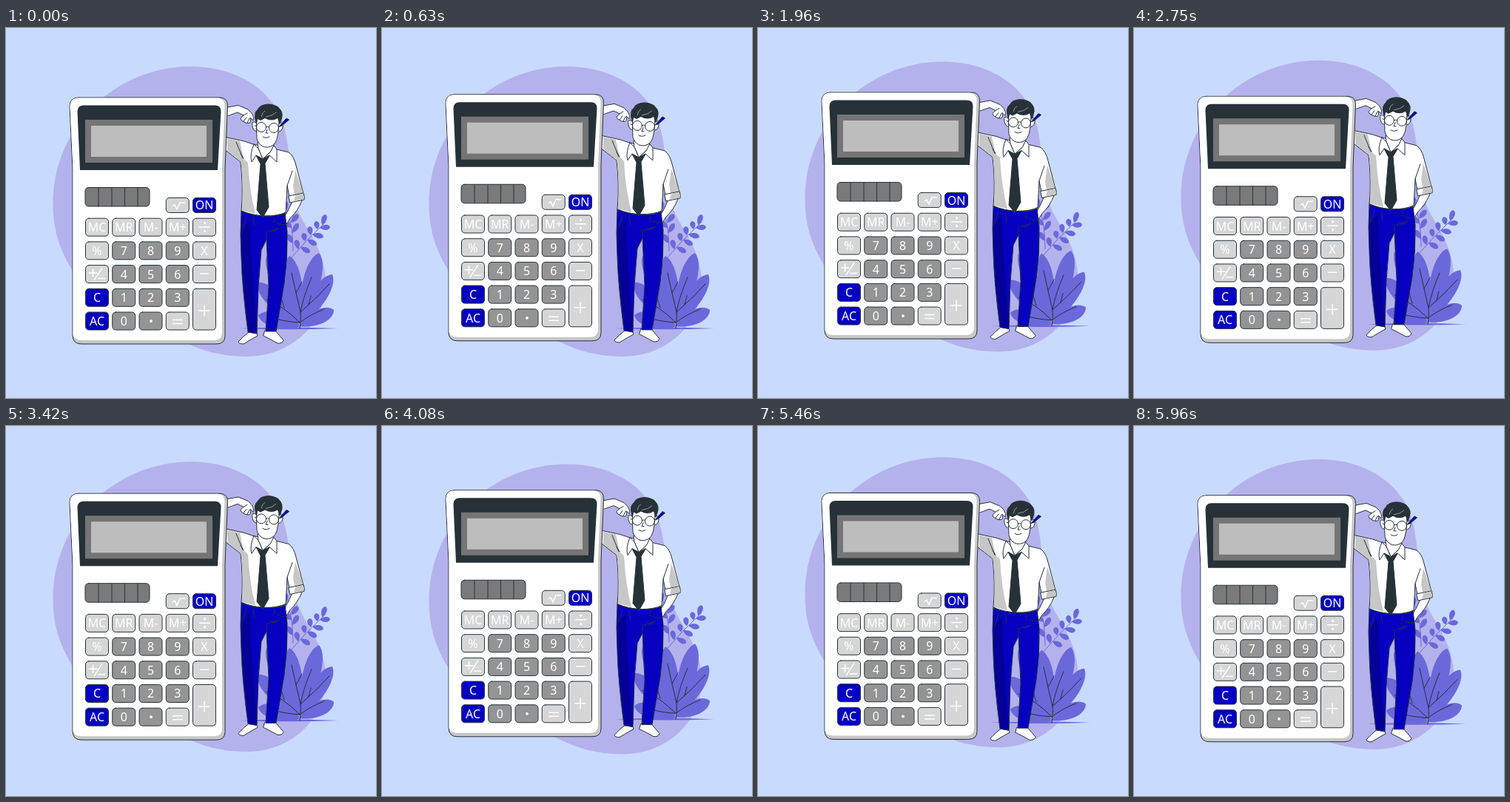
An HTML page for the animation above (6 s loop, 500 px wide and 500 px high).

```html
<!DOCTYPE html>
<html lang="en">
<head>
<meta charset="utf-8">
<title>Calculator</title>
<style>
  html, body { margin: 0; width: 100%; height: 100%; overflow: hidden; background: #c9daff; }
  svg { display: block; width: 100%; height: 100%; }
  text { font-family: "Noto Sans", "Open Sans", sans-serif; font-size: 16px; fill: #fff; text-anchor: middle; }
  .ink { stroke: #263238; stroke-width: 1; stroke-linejoin: round; stroke-linecap: round; }
  .white { fill: #fff; }
  .none { fill: none; }
  .dark { fill: #263238; }
  .grey { fill: #c7c7c7; }
  .blue { fill: #0600c0; }
  .sign { fill: none; stroke: #fff; stroke-width: 1.5; }
</style>
</head>
<body>
<svg viewBox="0 0 500 500">
  <path id="blob" fill="#b4b2ec" d="M250 52C300 52 344 73 366 110C387 148 381 198 391 237C400 268 430 294 432 340C434 400 385 444 325 444C290 444 262 435 240 424C190 400 121 385 88 325C71 296 63.500 270 63.500 238C63.500 133 148 52 250 52Z"/>

  <g id="plant" fill="#6b68dc">
    <path d="M315 406Q382 403.500 449 406Q382 408.500 315 406Z"/>
    <g id="leaves"></g>
    <path class="ink none" d="M397 406Q399 392 398 384Q391 355 386 331M398 384Q402 362 413 337M398 384Q420 365 437 346M397 398Q413 386 430 380M397 398Q374 375 352 367M376 378L368 352M397 398Q375 397 354 390M409 374L412 362M392 358L400 343"/>
    <path class="none" stroke="#6b68dc" d="M384 312Q405 287 432 262M378 240Q388 265 388 302"/>
  </g>

  <g id="man">
    <!-- raised arm -->
    <path class="ink white" d="M290 113L300 107L314 104.500L327 110L332 115Q336 121 334 125L330 121Q332 128 328 128.500Q324 129 321 126.500Q317 125 317 122L321 118L313 114L299 119L290 124Z"/>
    <path class="grey" d="M297 120L309 115L300 119V128H297Z"/>
    <path class="ink none" d="M321 118L326 115M321 126L325 121M326 128L329 122"/>
    <!-- forearm in pocket -->
    <path class="ink white" d="M400 233Q394 248 384 257L379 265L374 259L381 247L387 234Z"/>
    <!-- legs -->
    <path class="ink white" d="M328 411L339 413L340 416L331 421L321 427Q315 427 314 424Q320 417 328 411ZM350 409L364 409Q369 415 375 422Q373 427 367 426L356 420L348 416Z"/>
    <path class="ink blue" d="M318 248L377 250L380 275Q381 310 376 345L365 410L351 410L355 350L352 286L345 300L341 350L339 413L327 411Q319 350 318 310Q316 278 318 248Z"/>
    <path fill="#050098" d="M318.500 270L330 262Q330 305 334 340L339 411L328 410Q320 350 318.500 310Z"/>
    <path class="ink none" d="M352 286L352 276L367 271M334 256L336 268M363 257L362 263M325 255L320 272M366 263Q373 268 378 265M358 274Q365 276 369 270"/>
    <!-- shirt -->
    <path class="ink white" d="M290 145L299 148L322 153L334 157L366 164L382 168Q389 173 392 186L402 224L383 228L380 213L378 250Q366 255 350 254Q330 253 318 247Q321 215 317 181L299 167L290 160Z"/>
    <path class="grey" d="M299 149L316 153L321 176L327 182Q329 220 337 251L319 246.500Q321 215 317.500 181L299 166Z"/>
    <path class="grey" d="M391 192L401.500 223L390 225L388 214Z"/>
    <path class="ink none" d="M380 213L387 193M311 154L320 176M321 176L317 170M318 247Q335 254 350 254Q368 254 378 249"/>
    <path class="ink white" d="M382 227L402 223Q404 228 403 232L384 236Z"/>
    <path class="grey" d="M391 226L402 223.500V231.500L389 234Z"/>
    <path class="ink dark" d="M338 172L347 177L357 171L350 183L355 242L347 256L339 246L344 184Z"/>
    <path class="ink white" d="M340 155L341 163L347 177L361 164L362 155Z"/>
    <path class="ink white" d="M335 157L341 163L347 177L338 172L332 181Q329 171 335 157ZM362 159L366 164L366 181L356 172L347 177L357 168Z"/>
    <!-- head -->
    <path class="ink white" d="M338 128Q331 124 333 133Q335 141 339 139ZM368 128Q375 126 374 134Q372 141 367 140Z"/>
    <path class="ink white" d="M338 119L339 150Q342 159 350 161Q359 162 364 155Q369 146 369 119Z"/>
    <path class="dark" d="M337 126Q334 114 340 110Q343 103 354 102.500Q366 103 370 109Q375 114 373 122L370 131L367 122Q359 127 350 122L344 125L340 123L339 130Z"/>
    <path fill="none" stroke="#fff" stroke-width=".5" d="M345 120Q346 114 350 112M351 120Q360 119 365 114"/>
    <g class="ink none">
      <circle cx="345" cy="134" r="6.500"/>
      <circle cx="362" cy="135" r="6.500"/>
      <path d="M351.500 134Q353.500 132 355.500 134M338.500 133L336 132M368.500 134L371 132M353 137L351 142H354M347 147Q351 150 356 147"/>
    </g>
    <path class="ink blue" d="M371 131L379 122L382.500 124L373 132L370 133Z"/>
  </g>

  <g id="calc">
    <path class="ink grey" d="M98 94H290Q300 95 299.500 106L296 190V416Q296 427 284 427H102Q90 427 90 415V190L86 106Q86 94 98 94Z"/>
    <path class="white" d="M98 94.500H285Q296 95 295.500 106L292 190V411Q292 422 281 422H102Q92 422 90.500 415V190L86.500 106Q86.500 94.500 98 94.500Z"/>
    <path class="dark" d="M105 104.500H282Q291 104.500 290.500 113L286 192H100L96.500 113Q96.500 104.500 105 104.500Z"/>
    <path fill="#757575" d="M107 124H279V182H107Z"/>
    <path fill="#bdbdbd" d="M115 132H271V174H115Z"/>
    <rect class="ink" x="107" y="215.500" width="87" height="25.500" rx="4.500" fill="#7a7a7a"/>
    <path class="ink none" d="M125 216V241M143 216V241M160.500 216V241M178 216V241"/>
    <g id="keys"></g>
    <path class="sign" d="M225 241L228 239L231 245L235 236H242M261 269H276M262 332H274M260.500 382H275.500M268 374.500V389.500M225 394.500H239M225 399.500H239M112 331H123M117.500 325.500V336.500M119 341L130 324M124 338.500H134"/>
    <g class="white">
      <circle cx="268.500" cy="263.500" r="1.600"/>
      <circle cx="268.500" cy="274.500" r="1.600"/>
      <circle cx="196" cy="396" r="1.900"/>
    </g>
  </g>
</svg>
<script>
const $ = id => document.getElementById(id);
const light = '#d6d6d6', mid = '#949494', blue = '#0600c0';

function key(col, y, label, fill, h = 24) {
  const x = 107.5 + col * 36.25;
  return `<rect class="ink" x="${x}" y="${y}" width="31" height="${h}" rx="4.500" fill="${fill}"/>` +
    `<text x="${x + 15.5}" y="${y + h / 2 + 6}">${label}</text>`;
}

const rows = [['MC', 'MR', 'M-', 'M+', ''], ['%', 7, 8, 9, 'X'], ['', 4, 5, 6, ''],
  ['C', 1, 2, 3], ['AC', 0, '', '']];
let keys = key(3, 229.5, '', light, 20) + key(4, 229.5, 'ON', blue, 20) + key(4, 352.3, '', light, 55.7);
rows.forEach((row, r) => row.forEach((label, c) => {
  const numeric = r > 0 && c > 0 && c < 4 && !(r === 4 && c === 3);
  const fill = c === 0 && r > 2 ? blue : numeric ? mid : light;
  keys += key(c, 257.2 + r * 31.7, label, fill);
}));
$('keys').innerHTML = keys;

// Leaf from base (x, y) to tip (u, v), w wide on each side.
function leaf([x, y, u, v, w]) {
  const dx = u - x, dy = v - y, len = Math.hypot(dx, dy);
  const nx = -dy / len * w, ny = dx / len * w;
  const at = (k, s) => `${x + dx * k + nx * s} ${y + dy * k + ny * s}`;
  return `<path d="M${x} ${y}C${at(.4, 1.3)} ${at(.88, 1.3)} ${u} ${v}C${at(.88, -1.3)} ${at(.4, -1.3)} ${x} ${y}Z"/>`;
}

const big = [[397, 400, 352, 308, 10], [398, 400, 383, 308, 11], [399, 396, 423, 304, 12],
  [398, 402, 441, 333, 11], [396, 403, 443, 381, 10], [397, 403, 340, 344, 11], [397, 404, 341, 388, 10]];
const small = [[427, 266, 432, 252], [421, 272, 419, 261], [424, 270, 438, 269], [412, 280, 410, 268],
  [414, 279, 429, 282], [404, 288, 402, 277], [407, 286, 420, 293], [395, 299, 392, 286],
  [398, 296, 411, 303], [380, 245, 376, 233], [382, 250, 394, 240], [385, 263, 395, 252],
  [387, 277, 395, 264], [386, 270, 376, 261], [388, 291, 380, 279]];
$('leaves').innerHTML = big.concat(small.map(s => [...s, 3.7])).map(leaf).join('');

// Parts bob up 10 units and back: [period, delay] in ms.
const bobs = { calc: [3000, 0], man: [6000, 0], blob: [3000, 1000], plant: [6000, 1000] };

function draw(now) {
  const t = now % 6000;
  for (const id in bobs) {
    const [period, delay] = bobs[id];
    const p = Math.max(0, t - delay) % period / period;
    $(id).setAttribute('transform', `translate(0 ${-10 * (1 - Math.abs(1 - 2 * p))})`);
  }
  requestAnimationFrame(() => draw(performance.now() - start));
}
const start = performance.now();
draw(0);
</script>
</body>
</html>
```
